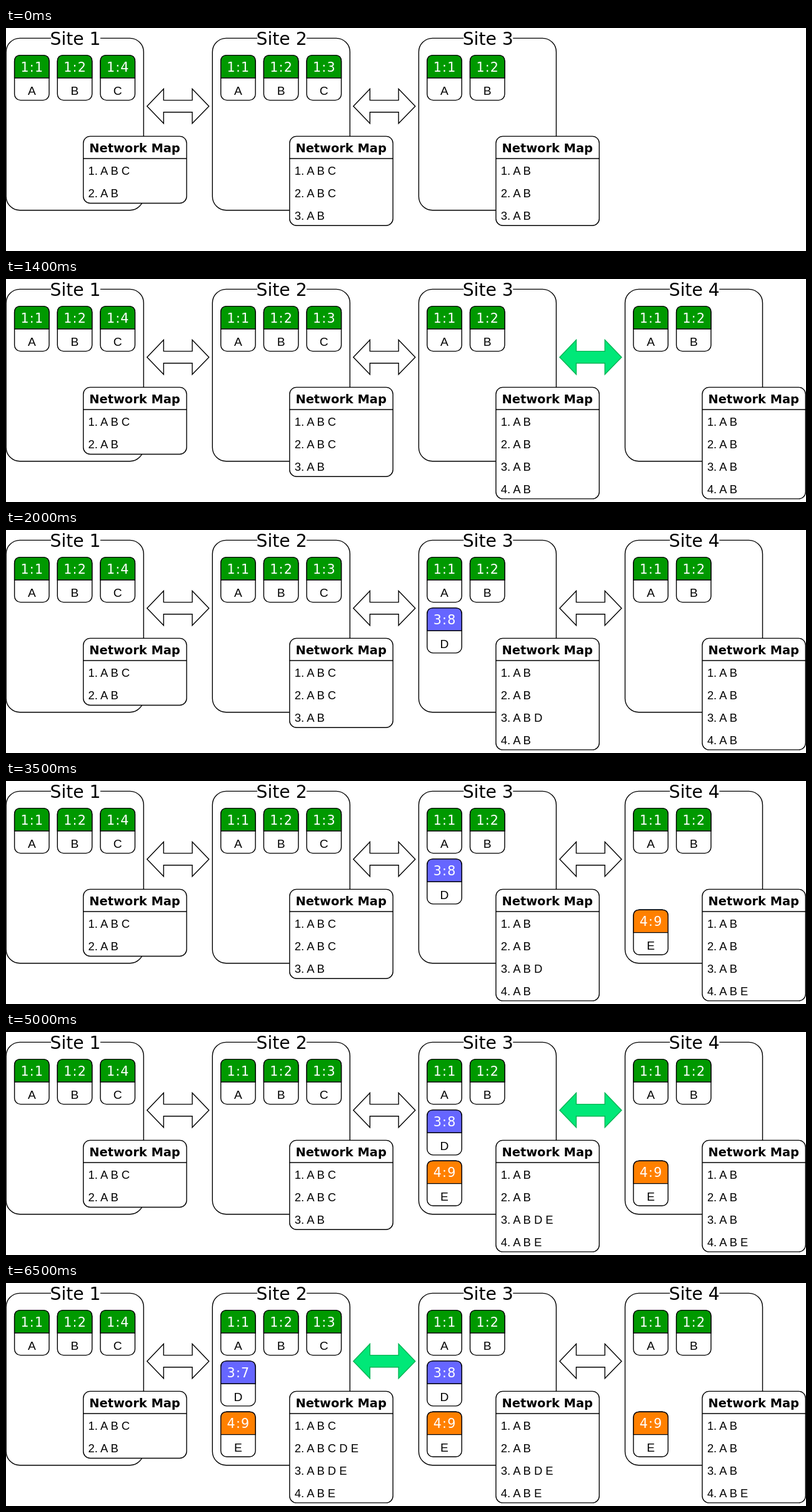
Write an HTML page that moves like this. It is 1280 px wide and 357 px high and loops after 8 s.

```html
<!DOCTYPE html>
<html lang="en">
<head>
<meta charset="utf-8">
<title>Network map</title>
<style>
  html, body { margin: 0; width: 100%; height: 100%; overflow: hidden; background: #fff; }
  svg { display: block; width: 1280px; height: 357px; }
  .shape { fill: #fff; stroke: #000; stroke-width: 1.4; }
  .live { fill: #00e878; stroke: #00b454; }
  text { font-family: "Liberation Sans", Arial, sans-serif; font-size: 18.4px; }
  .mid { text-anchor: middle; }
  .title, .id, .heading { font-family: "DejaVu Sans", Verdana, sans-serif; }
  .title { font-size: 28.2px; }
  .id { font-size: 20.6px; letter-spacing: 1.2px; fill: #fff; }
  .label { font-size: 19.2px; }
  .heading { font-size: 19.4px; font-weight: bold; }
</style>
</head>
<body>
<svg id="stage" viewBox="0 0 1280 357"></svg>
<script>
const stage = document.getElementById('stage');
const STARTS = [0, 500, 2000, 3500, 5000, 6500];
const LOOP = 8000;
const PITCH = 330.1;
const COLORS = ['#009900', '#6666ff', '#ff8000'];

const text = (cls, x, y, s) => `<text class="${cls}" x="${x}" y="${y}">${s}</text>`;
const box = (x, y, w, h, r) =>
  `<rect class="shape" x="${x}" y="${y}" width="${w}" height="${h}" rx="${r}"/>`;

function card(id, label, col, row) {
  const x = 13.6 + col * 68.7, y = 43.6 + row * 81.3, mid = x + 27.7;
  return box(x, y, 55.4, 72, 9.5) +
    `<path d="M${x} ${y + 36.4}v-26.9q0-9.5 9.5-9.5h36.4q9.5 0 9.5 9.5v26.9z"
      fill="${COLORS[row]}" stroke="#000" stroke-width="1.4"/>` +
    text('id mid', mid + .6, y + 26.2, id) + text('label mid', mid, y + 63.7, label);
}

function networkMap(rows) {
  return box(123.7, 173.4, 165.3, 35.7 * (rows.length + 1), 11) +
    '<path class="shape" d="M123.7 209H289"/>' +
    text('heading mid', 206, 198.8, 'Network Map') +
    rows.map((row, i) =>
      text('', 131.6, 235.4 + i * 35.8, `${i + 1}. ${[...row].join(' ')}`)).join('');
}

function site(index, cards, rows) {
  return `<g transform="translate(${index * PITCH})">` +
    box(.2, 16.4, 220, 275.3, 22) +
    '<path d="M72 16.4H151" stroke="#fff" stroke-width="4"/>' +
    text('title mid', 111, 27, `Site ${index + 1}`) +
    cards.map(c => card(...c)).join('') + networkMap(rows) + '</g>';
}

const arrow = (index, live) =>
  `<path class="shape ${live ? 'live' : ''}" transform="translate(${index * PITCH})"
    d="M225.7 125.2l26.5-27.6v18h45.8v-18l26.7 27.6-26.7 27.6v-18h-45.8v18z"/>`;

function draw(step) {
  const joined = step >= 1, hasD = step >= 2, hasE = step >= 3;
  const sharedE = step >= 4, synced = step >= 5;
  const common = [['1:1', 'A', 0, 0], ['1:2', 'B', 1, 0]];
  const cardE = ['4:9', 'E', 0, 2];

  const cards = [
    [...common, ['1:4', 'C', 2, 0]],
    [...common, ['1:3', 'C', 2, 0]],
    [...common],
    [...common]
  ];
  const maps = [['ABC', 'AB'], ['ABC', 'ABC', 'AB'], ['AB', 'AB', 'AB'], ['AB', 'AB', 'AB', 'AB']];

  if (joined) maps[2].push(sharedE ? 'ABE' : 'AB');
  if (hasD) {
    cards[2].push(['3:8', 'D', 0, 1]);
    maps[2][2] = sharedE ? 'ABDE' : 'ABD';
  }
  if (hasE) {
    cards[3].push(cardE);
    maps[3][3] = 'ABE';
  }
  if (sharedE) cards[2].push(cardE);
  if (synced) {
    cards[1].push(['3:7', 'D', 0, 1], cardE);
    maps[1] = ['ABC', 'ABCDE', 'ABDE', 'ABE'];
  }

  const count = joined ? 4 : 3;
  const liveLink = { 1: 2, 4: 2, 5: 1 }[step];
  let svg = '';
  for (let i = 0; i < count; i++) {
    svg += site(i, cards[i], maps[i]);
    if (i < count - 1) svg += arrow(i, i === liveLink);
  }
  stage.innerHTML = svg;
}

let shown = -1;
function tick() {
  const time = performance.now() % LOOP;
  const step = STARTS.findLastIndex(start => time >= start);
  if (step !== shown) draw(shown = step);
  requestAnimationFrame(tick);
}
tick();
</script>
</body>
</html>
```
